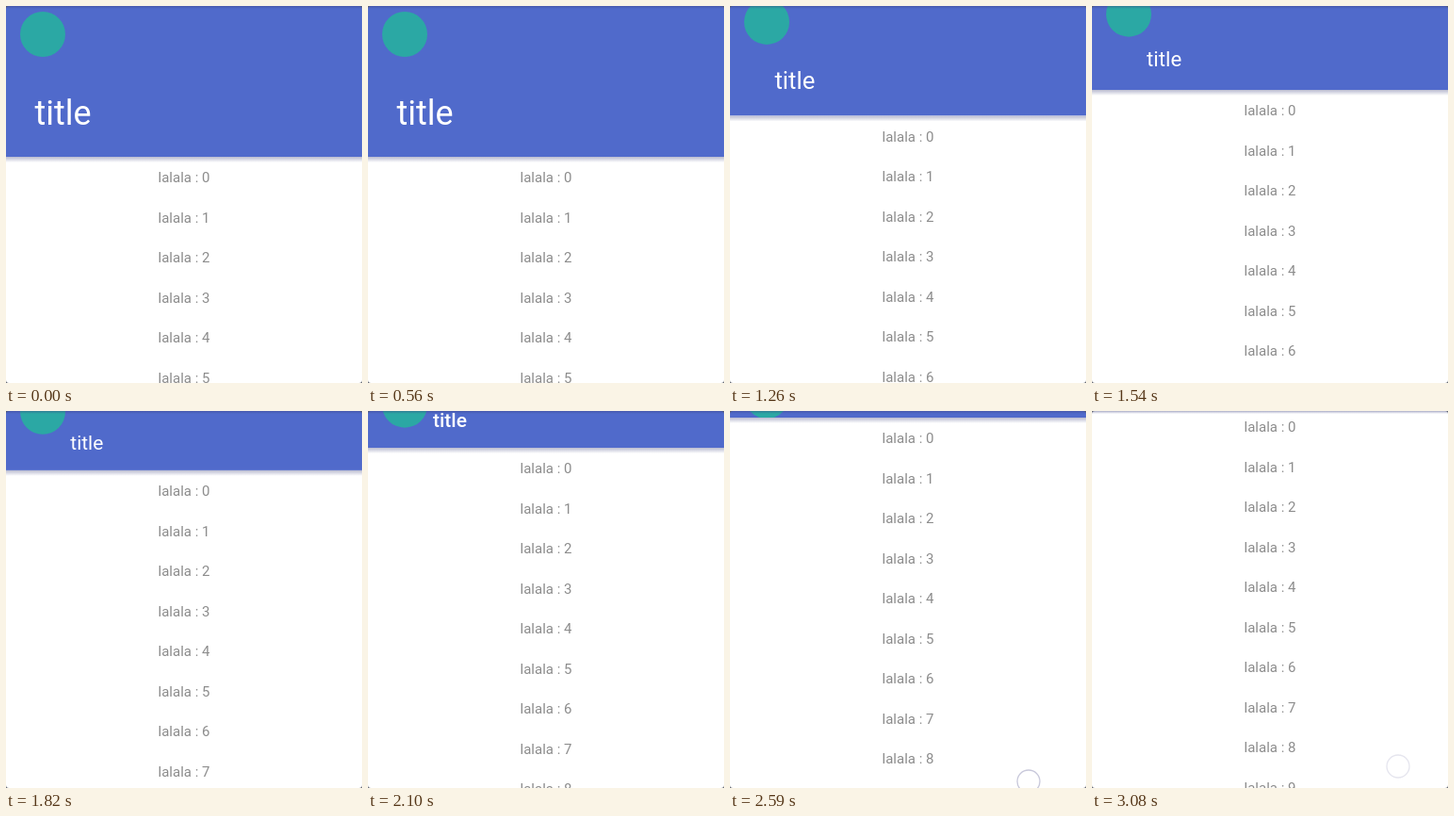
An HTML page with a canvas for the animation above (3.29 s loop, 378 by 400 pixels).

```html
<!DOCTYPE html>
<html lang="en">
<head>
<meta charset="utf-8">
<title>Collapsing app bar</title>
<style>
  html, body { margin: 0; width: 100%; height: 100%; overflow: hidden; background: #fff; }
  canvas { display: block; }
</style>
</head>
<body>
<canvas id="stage" width="378" height="400"></canvas>
<script>
const W = 378, H = 400, LOOP = 3290, STEP = 70;
const BAR = 160, COLLAPSE = 99, ROW = 42.5;
const ctx = document.getElementById('stage').getContext('2d');

// Scroll keys: time, offset, speed (px/ms)
const KEYS = [
  [980, 0, 0.12], [1260, 43.5, 0.125], [1540, 71, 0.094],
  [2100, 121, 0.078], [2590, 153, 0.044], [3080, 165, 0.008]
];
const mix = (a, b, p) => a + (b - a) * p;

function scrollAt(t) {
  if (t <= KEYS[0][0]) return 0;
  const i = KEYS.findIndex(k => k[0] >= t);
  if (i < 0) return KEYS[KEYS.length - 1][1];
  const [t0, y0, v0] = KEYS[i - 1], [t1, y1, v1] = KEYS[i];
  const d = t1 - t0, u = (t - t0) / d, w = 1 - u;
  return w * w * ((1 + 2 * u) * y0 + u * d * v0) + u * u * ((3 - 2 * u) * y1 - w * d * v1);
}

function fade(y, height, rgb, alpha) {
  const g = ctx.createLinearGradient(0, y, 0, y + height);
  g.addColorStop(0, `rgba(${rgb},${alpha})`);
  g.addColorStop(1, `rgba(${rgb},0)`);
  ctx.fillStyle = g;
  ctx.fillRect(0, y, W, height);
}

function disc(x, y, r) {
  ctx.beginPath();
  ctx.arc(x, y, r, 0, Math.PI * 2);
}

function drawList(top) {
  ctx.font = '15px Roboto, sans-serif';
  ctx.textAlign = 'center';
  ctx.fillStyle = '#8c8c8c';
  for (let i = 0; i < 10; i++) ctx.fillText('lalala : ' + i, 189, top + 27.3 + i * ROW);
}

function drawBar(bottom, scroll) {
  fade(bottom, 6, '70,75,130', 0.38);
  if (bottom <= 0) return;
  ctx.save();
  ctx.beginPath();
  ctx.rect(0, 0, W, bottom);
  ctx.clip();
  ctx.fillStyle = '#506acb';
  ctx.fillRect(0, 0, W, bottom);

  disc(39, 30 - scroll * 0.3, 24);
  ctx.fillStyle = '#2ba8a4';
  ctx.fill();

  const p = Math.min(1, scroll / COLLAPSE);
  const size = mix(36, 21, 1 - (1 - p) ** 2);
  ctx.font = `${p < 1 ? 400 : 500} ${size}px Roboto, sans-serif`;
  ctx.textAlign = 'left';
  ctx.fillStyle = '#fff';
  ctx.fillText('title', mix(30.5, 69, p), bottom - mix(34, 22, p));
  ctx.restore();
}

function drawTouch(scroll) {
  const u = (scroll - 153) / 12;
  disc(mix(317, 325, u), mix(393, 377, u), 12);
  ctx.fillStyle = '#fff';
  ctx.fill();
  ctx.strokeStyle = `rgba(190,190,212,${mix(0.85, 0.4, Math.max(0, u))})`;
  ctx.lineWidth = 1.3;
  ctx.stroke();
}

function drawEdges() {
  fade(0, 3, '55,60,125', 0.4);
  ctx.beginPath();
  ctx.rect(0, 0, W, H);
  ctx.roundRect(0, 0, W, H, 3);
  ctx.fillStyle = '#555a66';
  ctx.fill('evenodd');
}

function draw(now) {
  const t = Math.floor((now % LOOP) / STEP) * STEP;
  const scroll = scrollAt(t), bottom = BAR - scroll;
  ctx.fillStyle = '#fff';
  ctx.fillRect(0, 0, W, H);
  drawList(bottom);
  drawBar(bottom, scroll);
  if (scroll > 121) drawTouch(scroll);
  drawEdges();
  requestAnimationFrame(draw);
}
requestAnimationFrame(draw);
</script>
</body>
</html>
```
